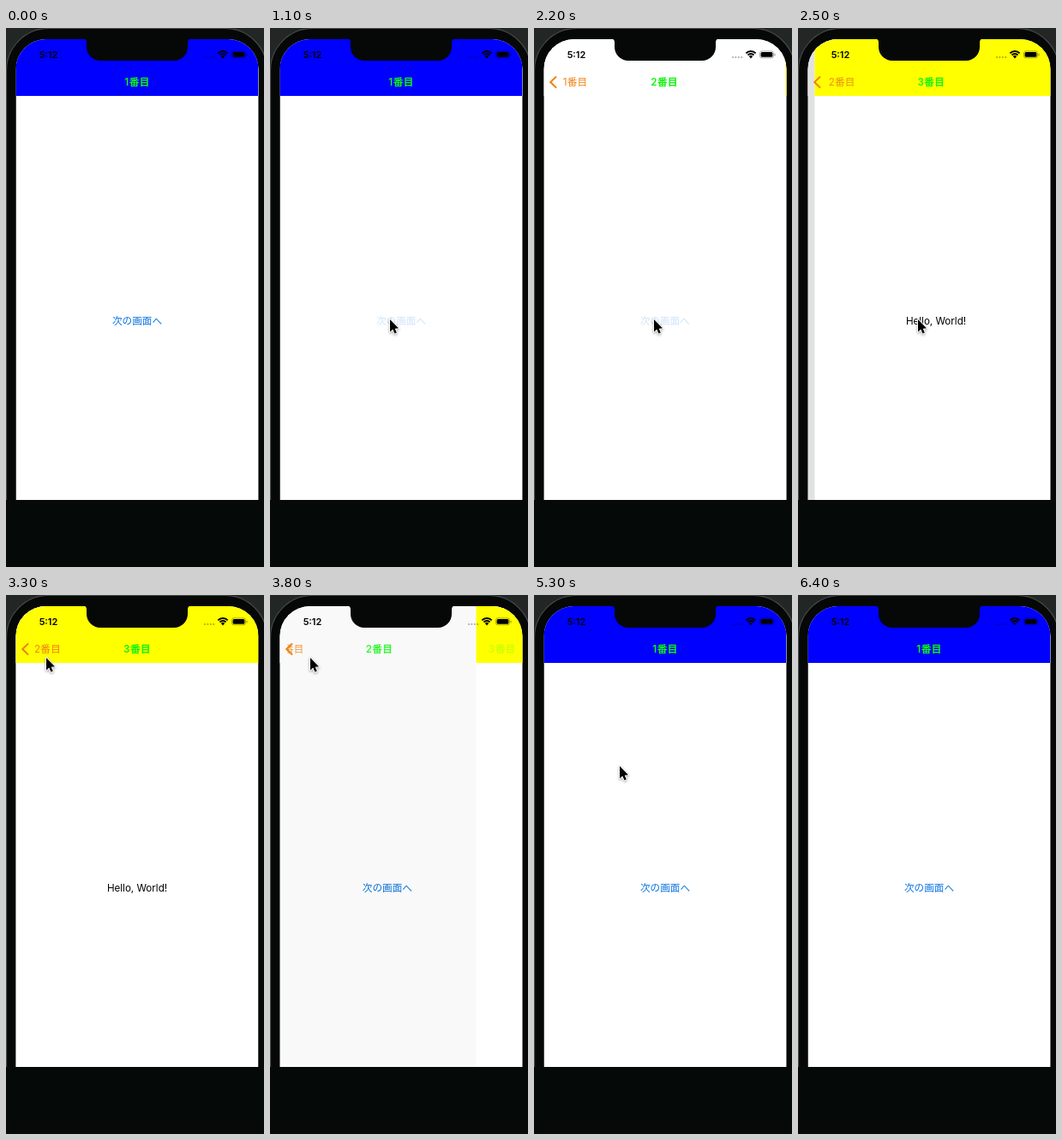
An HTML page with a canvas that plays this animation: 301 px wide and 627 px high, repeating every 6500 ms.

```html
<!DOCTYPE html>
<html lang="ja">
<head>
<meta charset="utf-8">
<title>Navigation bar colours</title>
<style>
html, body { margin: 0; width: 100%; height: 100%; overflow: hidden; background: #050908; }
canvas { display: block; }
</style>
</head>
<body>
<canvas id="stage" width="301" height="627"></canvas>
<script>
const g = document.getElementById('stage').getContext('2d');
const LOOP = 6500, STEP = 100;
const LEFT = 11.5, TOP = 13, WIDTH = 283, BOTTOM = 549, BAR = 79, MID = 153;
const FONT = 'Inter, "Noto Sans CJK JP", "Noto Sans CJK", sans-serif';
const ORANGE = '#ef8414', GREEN = '#0cf50c', LINK = '#0872e0';
const pages = {
  1: { bar: '#00f', text: '次の画面へ', color: LINK },
  2: { bar: '#fff', text: '次の画面へ', color: LINK },
  3: { bar: '#ff0', text: 'Hello, World!', color: '#000' }
};
// time, x, y of the pointer tip
const pointer = [
  [100, 34, 276], [300, 140, 324], [400, 140, 324], [700, 39, 65],
  [1000, 140, 339], [2700, 140, 339], [3300, 47, 73], [5200, 47, 73], [5400, 153, 325]
];

function spring(ms) {
  const x = Math.max(0, ms) * 0.0177;
  return 1 - (1 + x) * Math.exp(-x);
}

// opacity of a button held from a to b, then fading back
function held(t, a, b, low) {
  if (t < a) return 1;
  return t < b ? low : Math.min(1, low + (1 - low) * (t - b) / 300);
}

function text(str, x, y, color, { alpha = 1, size = 11.62, weight = 400, gap = 0 } = {}) {
  if (alpha < 0.01) return;
  g.save();
  g.globalAlpha = alpha;
  g.font = `${weight} ${size}px ${FONT}`;
  g.letterSpacing = gap + 'px';
  g.textAlign = 'center';
  g.fillStyle = color;
  g.fillText(str, x, y);
  g.restore();
}

function path(points, close) {
  g.beginPath();
  points.forEach(([x, y]) => g.lineTo(x, y));
  if (close) g.closePath();
}

function box(x, y, w, h, r, color) {
  g.beginPath();
  g.roundRect(x, y, w, h, r);
  g.fillStyle = color;
  g.fill();
}

function drawPage(n, dx, alpha, dim) {
  const { bar, text: label, color } = pages[n];
  g.fillStyle = '#fff';
  g.fillRect(LEFT + dx, TOP, WIDTH, BOTTOM - TOP);
  g.fillStyle = bar;
  g.fillRect(LEFT + dx, TOP, WIDTH, BAR - TOP);
  text(label, MID + dx, 344.5, color, { alpha });
  g.fillStyle = `rgba(0,0,0,${dim})`;
  g.fillRect(LEFT, TOP, WIDTH, BOTTOM - TOP);
}

// p: how far the front page covers the back one
function drawBar(back, p, press) {
  const q = 1 - p, y = 67.3, name = n => n + '番目';
  const bold = { weight: 600, gap: 0.4 };
  const shared = MID - 104.5 * p ** 0.85;
  text(name(back), shared, y, GREEN, { ...bold, alpha: q });
  text(name(back), shared, y, ORANGE, { alpha: p ** 3 * press, gap: 0.2 });
  text(name(back + 1), MID + 151 * q ** 1.18, y, GREEN, { ...bold, alpha: p });
  if (back > 1) {
    g.save();
    g.beginPath();
    g.rect(20, 50, 274, 29);
    g.clip();
    text(name(back - 1), 48.5 - 122 * p, y, ORANGE, { alpha: q, gap: 0.2 });
    g.restore();
  }
  g.save();
  g.globalAlpha = (back > 1 ? 1 : p ** 1.6) * press;
  g.strokeStyle = ORANGE;
  g.lineWidth = 2;
  g.lineCap = 'round';
  path([[25.5, 57], [19.2, 63], [25.5, 69]]);
  g.stroke();
  g.restore();
}

function drawStatus() {
  text('5:12', 49.5, 35, '#000', { size: 11, weight: 600 });
  for (let i = 0; i < 4; i++) box(231 + i * 3.4, 33, 2, 2, 1, 'rgba(0,0,0,.35)');
  g.strokeStyle = '#000';
  g.lineWidth = 1.9;
  for (const r of [8, 5]) {
    g.beginPath();
    g.arc(253, 35, r, -Math.PI * 0.75, -Math.PI * 0.25);
    g.stroke();
  }
  g.beginPath();
  g.moveTo(253, 35.4);
  g.arc(253, 35, 3, -Math.PI * 0.75, -Math.PI * 0.25);
  g.fillStyle = '#000';
  g.fill();
  g.beginPath();
  g.roundRect(263.5, 26.9, 16, 8, 2.4);
  g.strokeStyle = 'rgba(0,0,0,.4)';
  g.lineWidth = 0.8;
  g.stroke();
  box(264.6, 28, 13.8, 5.8, 1.5, '#000');
  box(280.5, 29.6, 1, 2.8, 0.5, 'rgba(0,0,0,.45)');
}

function drawPhone() {
  g.fillStyle = '#050908';
  g.fillRect(0, 0, 301, 627);
  g.fillStyle = '#222625';
  g.fillRect(0, 0, 301, 50);
  g.save();
  g.beginPath();
  g.rect(0, 0, 301, BOTTOM);
  g.clip();
  box(0.5, 0.5, 304, 640, 49, '#050807');
  g.strokeStyle = '#4a4d4c';
  g.lineWidth = 1.2;
  g.stroke();
  g.restore();
}

function drawNotch() {
  g.fillStyle = '#050807';
  g.beginPath();
  g.moveTo(91, 12.5);
  g.quadraticCurveTo(94, 13, 94, 17);
  g.lineTo(94, 22);
  g.arcTo(94, 38, 110, 38, 16);
  g.lineTo(196, 38);
  g.arcTo(212, 38, 212, 22, 16);
  g.lineTo(212, 17);
  g.quadraticCurveTo(212, 13, 215, 12.5);
  g.fill();
}

function drawPointer(t) {
  const i = pointer.findIndex(k => k[0] >= t);
  if (t < pointer[0][0] || i < 0) return;
  const b = pointer[i], a = pointer[Math.max(0, i - 1)];
  const f = b === a ? 0 : (t - a[0]) / (b[0] - a[0]);
  const e = f * f * (3 - 2 * f);
  g.save();
  g.translate(a[1] + (b[1] - a[1]) * e, a[2] + (b[2] - a[2]) * e);
  path([[0, 0], [0, 14.5], [3.3, 11.5], [5.5, 16.6], [7.8, 15.6], [5.7, 10.7], [10, 10.3]], true);
  g.shadowColor = 'rgba(0,0,0,.4)';
  g.shadowBlur = 3;
  g.shadowOffsetY = 1;
  g.strokeStyle = '#fff';
  g.lineWidth = 1.8;
  g.lineJoin = 'round';
  g.stroke();
  g.shadowColor = 'transparent';
  g.fillStyle = '#000';
  g.fill();
  g.restore();
}

function draw(t) {
  const back = t >= 2195 && t < 4400 ? 2 : 1;
  const [push, pop] = back === 2 ? [2195, 3627] : [1240, 4516];
  // the upper pair only matters while its own push or pop is running
  const p = Math.max(0, spring(t - push) - spring(t - pop));
  const link = back === 2 ? held(t, 2000, 2200, 0.2) : held(t, 1050, 1240, 0.2);
  const frontLink = back === 1 && t < 2195 ? held(t, 2000, 2200, 0.2) : 1;
  const press = (t >= 3400 && t < 3627) || (t >= 4400 && t < 4516) ? 0.35 : 1;

  drawPhone();
  g.save();
  g.beginPath();
  g.roundRect(LEFT, TOP, WIDTH, BOTTOM - TOP, [35, 35, 0, 0]);
  g.clip();
  drawPage(back, -0.3 * WIDTH * p, link, 0.12 * p);
  drawPage(back + 1, Math.round(WIDTH * (1 - p)), frontLink, 0);
  drawBar(back, p, press);
  drawStatus();
  g.restore();
  drawNotch();
  drawPointer(t);
}

function tick(now) {
  draw(Math.floor(now % LOOP / STEP) * STEP);
  requestAnimationFrame(tick);
}
requestAnimationFrame(tick);
</script>
</body>
</html>
```
